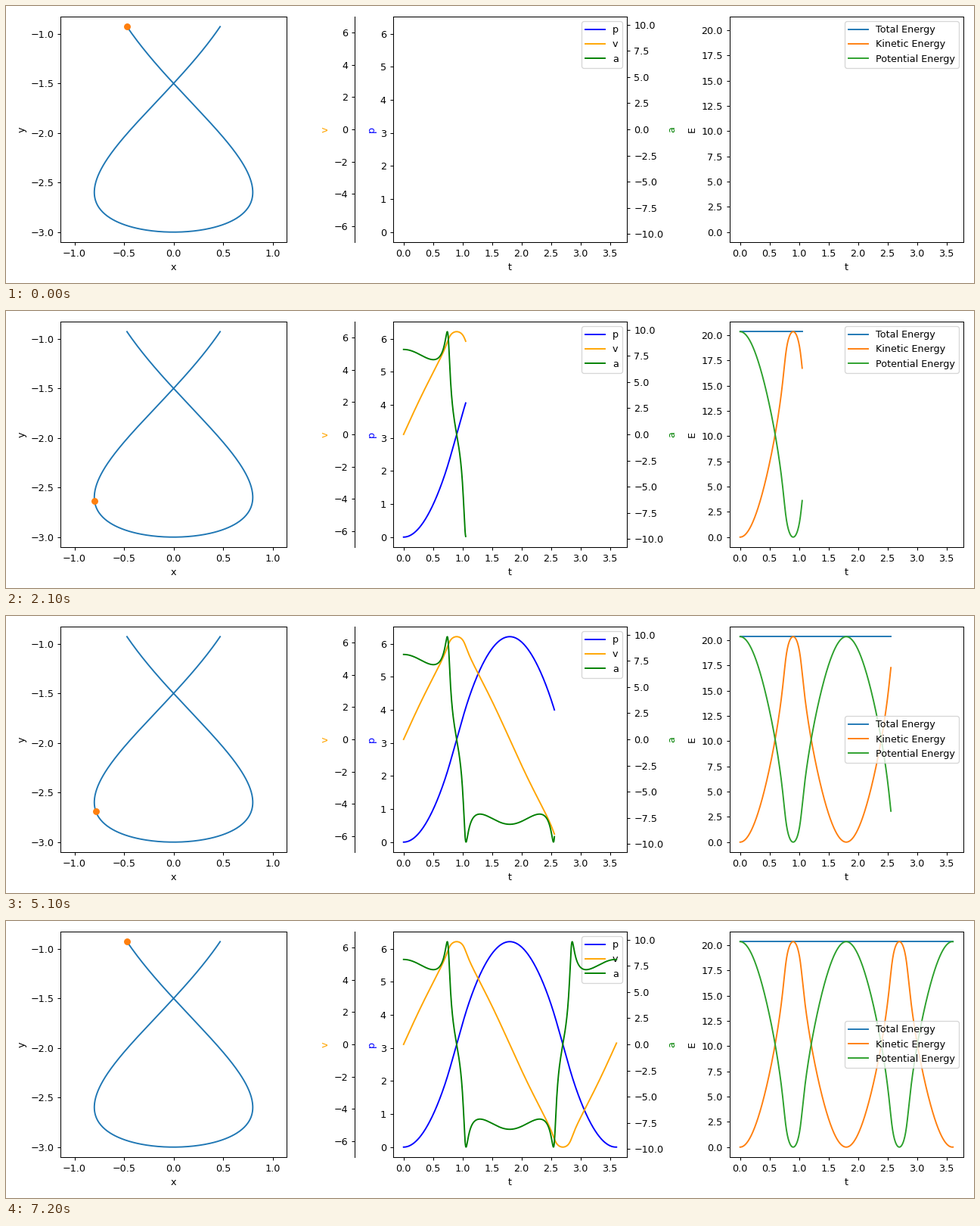
Recreate the animation shown at these times as a matplotlib script. Size 1280 by 366 pixels, loop 7300 ms.

```python
import numpy as np
import matplotlib.pyplot as plt
from matplotlib.animation import FuncAnimation

plt.rcParams["font.family"] = "DejaVu Sans"

W, H = 1280, 366
DPI = W / 14
G = 9.81
END = 0.4 * np.pi
FRAMES, STRIDE = 73, 10
STEPS = (FRAMES - 1) * STRIDE
DT = 3.61 / STEPS


def track(u):
    return 0.8 * np.sin(3 * u), -3 * np.cos(u)


def slope(u):
    """Speed of the parametrisation and pull along the track."""
    dx, dy = 2.4 * np.cos(3 * u), 3 * np.sin(u)
    ds = np.hypot(dx, dy)
    return ds, G * dy / ds


def rate(q):
    ds, acc = slope(q[0])
    return np.array([-q[1] / ds, acc, q[1]])


def simulate():
    """RK4 for a bead sliding without friction: parameter, speed, path."""
    q = np.array([END, 0.0, 0.0])
    out = [q]
    for _ in range(STEPS):
        k1 = rate(q)
        k2 = rate(q + DT / 2 * k1)
        k3 = rate(q + DT / 2 * k2)
        k4 = rate(q + DT * k3)
        q = q + DT / 6 * (k1 + 2 * k2 + 2 * k3 + k4)
        out.append(q)
    return np.array(out).T


u, v, p = simulate()
t = np.arange(len(u)) * DT
a = slope(u)[1]
x, y = track(u)
kinetic = v**2 / 2
potential = G * (y + 3)
total = kinetic + potential


def span(data, pad=0.05):
    lo, hi = np.min(data), np.max(data)
    return lo - pad * (hi - lo), hi + pad * (hi - lo)


curves = []


def curve(ax, data, label, **style):
    line, = ax.plot([], [], label=label, **style)
    ax.set_xlim(span(t))
    ax.set_ylim(span(data))
    curves.append((line, data))
    return line


fig, (ax, ax_p, ax_e) = plt.subplots(1, 3, figsize=(14, H / DPI), dpi=DPI)

# Track with bead
ax.plot(*track(np.linspace(-END, END, 400)))
bead, = ax.plot([], [], "o")
ax.set_ylim(span(y))
half = np.ptp(span(y)) / 2
ax.set_xlim(-half, half)
ax.set_box_aspect(1)
ax.set_xlabel("x")
ax.set_ylabel("y")

# Path, speed and acceleration on three scales
ax_v, ax_a = ax_p.twinx(), ax_p.twinx()
ax_v.spines["left"].set_position(("outward", 40))
ax_v.yaxis.set_label_position("left")
ax_v.yaxis.set_ticks_position("left")
motion = []
for axis, data, name, color in ((ax_p, p, "p", "blue"),
                                (ax_v, v, "v", "orange"),
                                (ax_a, a, "a", "green")):
    motion.append(curve(axis, data, name, color=color))
    axis.set_ylabel(name, color=color)
ax_p.set_xlabel("t")
ax_p.legend(handles=motion, loc="upper right")

# Energies
curve(ax_e, total, "Total Energy")
curve(ax_e, kinetic, "Kinetic Energy")
curve(ax_e, potential, "Potential Energy")
ax_e.set_xlabel("t")
ax_e.set_ylabel("E")
legend = ax_e.legend(loc="upper right")

fig.tight_layout()


def update(i):
    n = i * STRIDE
    bead.set_data([x[n]], [y[n]])
    for line, data in curves:
        line.set_data(t[:n + 1], data[:n + 1])
    # The legend steps aside once the curves reach it
    legend.set_loc("upper right" if i < 36 else "center right")
    return [bead, legend] + [line for line, _ in curves]


anim = FuncAnimation(fig, update, frames=FRAMES, interval=100,
                     repeat=True, repeat_delay=0, blit=False)
plt.show()
```
